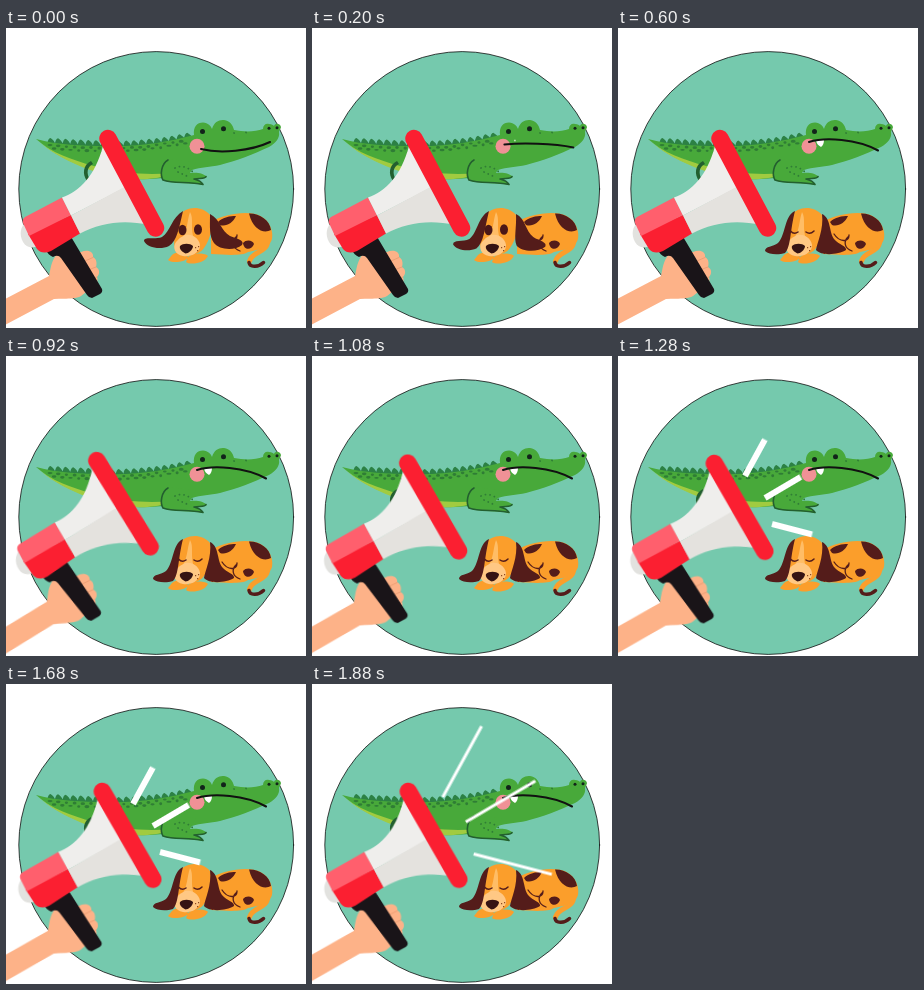
Animation of 300 by 300 pixels, one loop 1920 ms. Source, as an HTML page:

```html
<!DOCTYPE html>
<html lang="en">
<head>
<meta charset="utf-8">
<title>Megaphone, crocodile and dog</title>
<style>
html, body { margin: 0; width: 100%; height: 100%; overflow: hidden; background: #fff; }
svg { display: block; width: 100vw; height: 100vh; }
.anim { animation: 1920ms linear infinite both; }

/* Crocodile: smile turns into a frown */
.mouth { animation-name: mouth; }
@keyframes mouth {
  0% { d: path("M195 121C214 126 245 123 264 114"); animation-timing-function: cubic-bezier(.6,0,.25,1); }
  21%, 100% { d: path("M191 114C207 109 239 111 260 122.5"); }
}
.tooth { transform-origin: 203px 112px; animation-name: tooth; }
@keyframes tooth {
  0%, 8% { transform: scale(0); }
  20%, 100% { transform: none; }
}

/* Dog: ears drop, eyes close */
.ear-l { animation-name: earL; }
@keyframes earL {
  0% { d: path("M177 183C166 189 164 204 156 209C149 212 138 208 138 213C141 220 155 222 163 218C171 213 173 200 177 183Z"); animation-timing-function: cubic-bezier(.5,0,.2,1); }
  31.25%, 100% { d: path("M177 183C166 188 168 207 160 215C155 219 147 218 147 223C151 227 161 227 167 225C173 219 172 202 177 183Z"); }
}
.ear-r { animation-name: earR; }
@keyframes earR {
  0% { d: path("M204 186C204 199 203 208 208 215C213 222 229 223 236 217C239 212 231 211 224 208C215 203 214 191 204 186Z"); animation-timing-function: cubic-bezier(.5,0,.2,1); }
  31.25%, 100% { d: path("M204 186C206 201 199 215 198 222C203 228 220 227 228 222C229 218 221 217 216 211C211 204 213 190 204 186Z"); }
}
.open { transform-box: fill-box; transform-origin: 50% 80%; animation-name: shut; }
@keyframes shut {
  0%, 25% { transform: none; opacity: 1; }
  31.2% { transform: scaleY(.25); opacity: 1; }
  31.25%, 100% { transform: scaleY(.25); opacity: 0; }
}
.closed { animation-name: show; animation-timing-function: step-end; }
@keyframes show { 0% { opacity: 0; } 31.25%, 100% { opacity: 1; } }

/* Megaphone shakes, then rests slightly raised */
.horn { transform-origin: 6px 278px; animation-name: shake; animation-timing-function: ease-in-out; }
@keyframes shake {
  0%, 42.7% { transform: none; }
  47.9% { transform: rotate(-3.75deg); }
  53.1% { transform: rotate(-.5deg); }
  58.3% { transform: rotate(-2.8deg); }
  63.5% { transform: rotate(-1.6deg); }
  66.6%, 100% { transform: rotate(-1.9deg); }
}

/* Sound rays stretch and thin out, twice */
.ray { animation-name: ray; }
@keyframes ray {
  0% { opacity: 0; d: path("M-2 0H29"); stroke-width: 7; animation-timing-function: step-end; }
  58.33% { opacity: 1; d: path("M-2 0H29"); stroke-width: 7; animation-timing-function: cubic-bezier(.76,0,.24,1); }
  79.15% { opacity: 1; d: path("M8 0H89"); stroke-width: 3; animation-timing-function: step-end; }
  79.16% { opacity: 1; d: path("M-2 0H29"); stroke-width: 7; animation-timing-function: cubic-bezier(.76,0,.24,1); }
  100% { opacity: 1; d: path("M8 0H89"); stroke-width: 3; }
}
</style>
</head>
<body>
<svg viewBox="0 0 300 300" fill="none" stroke-linecap="round" stroke-linejoin="round">
  <circle cx="150.2" cy="161" r="137.4" fill="#75c9ad" stroke="#111" stroke-width=".8"/>

  <g id="croc">
    <path id="spikes" fill="#2c8144"/>
    <path fill="#48a93a" d="M30 111C52 117 76 118 100 118C134 119 162 114 188 107C187 99 191 94.500 197 94.500C202 95 205 98 206 101C208 94 213 91.500 218 92C224 93 227 97 228 102C238 104 249 104 257 101C257 97 260 95 263 96C266 96 267 97 268 98C269 95 274 95 275 99C275 101 273 102 273 104C274 110 270 115 263 119C248 126 230 133 214 137C204 139 195 139 186 142C172 149 150 152 130 151C98 148 57 135 30 111Z"/>
    <path fill="#a1cb40" d="M31 112C44 124 66 132 88 138C118 146 143 147 166 145C157 150 143 152 126 151C92 148 54 133 31 112Z"/>
    <g id="spots" fill="#2f7d35"/>
    <path fill="#48a93a" d="M163 131C155 136 154 147 157 152C166 156 182 154 197 157C195 153 192 152 188 151C194 150 199 151 201 149C198 145 190 144 184 145L190 134Z"/>
    <path stroke="#235f2f" stroke-width="1.600" d="M162 132C155 136 154 147 157 152C168 156 182 153 197 156.500C195 153 192 152 188 151C194 150 199 151 200 148.500"/>
    <path fill="#235f2f" d="M85 133C77 137 76 146 81 153L84 152C80 145 81 139 87 136Z"/>
    <path stroke="#2f7d35" stroke-width="1.800" stroke-dasharray=".1 4.500" d="M169 140C177 136 184 141 188 145M172 144L183 149M228 105L232 107M240 104.500L243 106"/>
    <g fill="#12231a">
      <circle cx="196.500" cy="103.500" r="2.500"/><circle cx="217.500" cy="100.700" r="2.500"/>
      <circle cx="263" cy="100.300" r="1.500"/><circle cx="271" cy="99.800" r="1.500"/>
    </g>
    <circle cx="191" cy="118.300" r="7.500" fill="#f09196"/>
    <path class="anim tooth" fill="#fff" d="M198 112.500Q202 111 206 111.500Q206 117 203 119Q199 117 198 112.500Z"/>
    <path class="anim mouth" stroke="#111" stroke-width="2" d="M195 121C214 126 245 123 264 114"/>
  </g>

  <g id="dog">
    <path stroke="#fb9e2b" stroke-width="5" d="M262 212C261 226 247 222 243.500 233"/>
    <path stroke="#541c1a" stroke-width="3.500" d="M243 234.500C244 240 253 239 257.500 234.500"/>
    <path fill="#fb9e2b" d="M205 194C216 187 236 183 249 186C262 189 268 202 266 211C263 221 250 222 242 224C236 228 222 227 205 226Z"/>
    <path fill="#541c1a" d="M243 185.500C253 185 264 192 265 202C258 206 247 202 243 185.500ZM212 194C217 189 224 188 230 188C227 195 220 199 214 197ZM237 215C240 211 247 212 248 216C246 222 238 223 237 215Z"/>
    <path stroke="#541c1a" stroke-width="1.300" d="M216 206C222 215 231 214 231 207M234 223C226 220 225 213 231 208"/>
    <path fill="#fb9e2b" d="M166 227C171 223 182 224 182 230C178 235 164 235 162 232ZM182 229C187 224 200 225 202 228C198 236 184 237 180 234Z"/>
    <path fill="#fb9e2b" d="M173 188C179 178 196 177 204 187C208 198 204 212 198 220C193 228 177 230 170 224C166 216 169 198 173 188Z"/>
    <path fill="#ffbd66" d="M184 184C188 190 184 201 188 211L175 212C182 203 181 192 184 184Z"/>
    <path fill="#ffc884" d="M179 207C187 205 195 212 194 219C192 226 184 229 177 228C169 227 166 219 170 214Q174 209 179 207Z"/>
    <path class="anim ear-l" fill="#541c1a"/>
    <path class="anim ear-r" fill="#541c1a"/>
    <g class="anim open" fill="#4b1717">
      <ellipse cx="176.500" cy="202" rx="4" ry="5.300"/><ellipse cx="192" cy="201.500" rx="4" ry="5.300"/>
    </g>
    <path class="anim closed" stroke="#541c1a" stroke-width="1.500" d="M172.500 203Q176 207 180 204M188 204Q192 207 196 203"/>
    <path fill="#351313" d="M174 218C177 215 184 215 187 218C187 222 182 225.500 179.500 225.500C176 224 173 221 174 218Z"/>
    <path fill="#8e4a20" d="M189 219h1.200v1.200h-1.200zM191 222h1.200v1.200h-1.200zM192 218h1.200v1.200h-1.200z"/>
  </g>

  <g class="anim horn">
    <path fill="#fdb288" d="M-20 281L43 248C45 238 46 229 54 224L75 224C82 221 88 224 87 229C91 231 91 236 90 239C94 241 94 246 91 249C93 254 89 259 84 261L75 268C68 272 58 270 48 271L-20 307Z"/>
    <path stroke="#e99a70" stroke-width=".8" d="M79 233L87 229.500M82 242L90 239M85 251L91 249"/>
    <path fill="#e2e2df" d="M21 193C14 198 13 207 17 214C20 219 25 221 32 218Z"/>
    <path fill="#191418" d="M40 222L64 207L96 261Q97 264 94 266L86 270Q83 270 81 267L55 230Q52 226 47 229Q42 227 40 222Z"/>
    <path fill="#fb1f31" d="M22 206L65 187L74 205.500L45 223Q36 227 31 221Z"/>
    <path fill="#ff5f6d" d="M19 189L56 169.500L65 187L23 208L17 195Q16 191 19 189Z"/>
    <path fill="#efeeec" d="M97 118C89 148 74 163 56 169.500L65 187.500L122 158Z"/>
    <path fill="#e4e2de" d="M65 187.500L122 157L143 197C117 191 94 195 74 205.500Z"/>
    <path stroke="#fb1f31" stroke-width="17.500" d="M102 110.500L149.500 200"/>
  </g>

  <g id="rays" stroke="#fff" stroke-linecap="butt"/>
</svg>
<script>
const $ = id => document.getElementById(id);

function add(parent, tag, attrs) {
  const el = document.createElementNS("http://www.w3.org/2000/svg", tag);
  for (const key in attrs) el.setAttribute(key, attrs[key]);
  return parent.appendChild(el);
}

// Height of the crocodile's back at x
const back = x => 118 - 10 * Math.max(0, (x - 100) / 86) ** 2 - 3 * Math.max(0, (100 - x) / 58);

let spikes = "";
for (let x = 41; x < 184; x += 7.6) {
  spikes += `M${x} ${back(x) + 2}Q${x + 1} ${back(x) - 5} ${x + 3.5} ${back(x) - 5}Q${x + 7} ${back(x) - 3} ${x + 9} ${back(x + 9) + 2}Z`;
}
$("spikes").setAttribute("d", spikes);

// Two loose rows of spots below the back
let seed = 7;
const rand = () => (seed = seed * 16807 % 2147483647) / 2147483647;
for (let i = 0; i < 34; i++) {
  const x = 44 + i * 4.1;
  add($("spots"), "ellipse", {
    cx: x, cy: back(x) + 2 + i % 2 * 3 + rand(), rx: 1.3 + rand() * 1.3, ry: .9 + rand() * .7
  });
}

// Start point and direction of each ray
for (const [x, y, angle] of [[127, 120, -61.3], [147, 142, -30.5], [154, 168, 14.6]]) {
  const g = add($("rays"), "g", { transform: `translate(${x} ${y}) rotate(${angle})` });
  add(g, "path", { class: "anim ray" });
}
</script>
</body>
</html>
```
